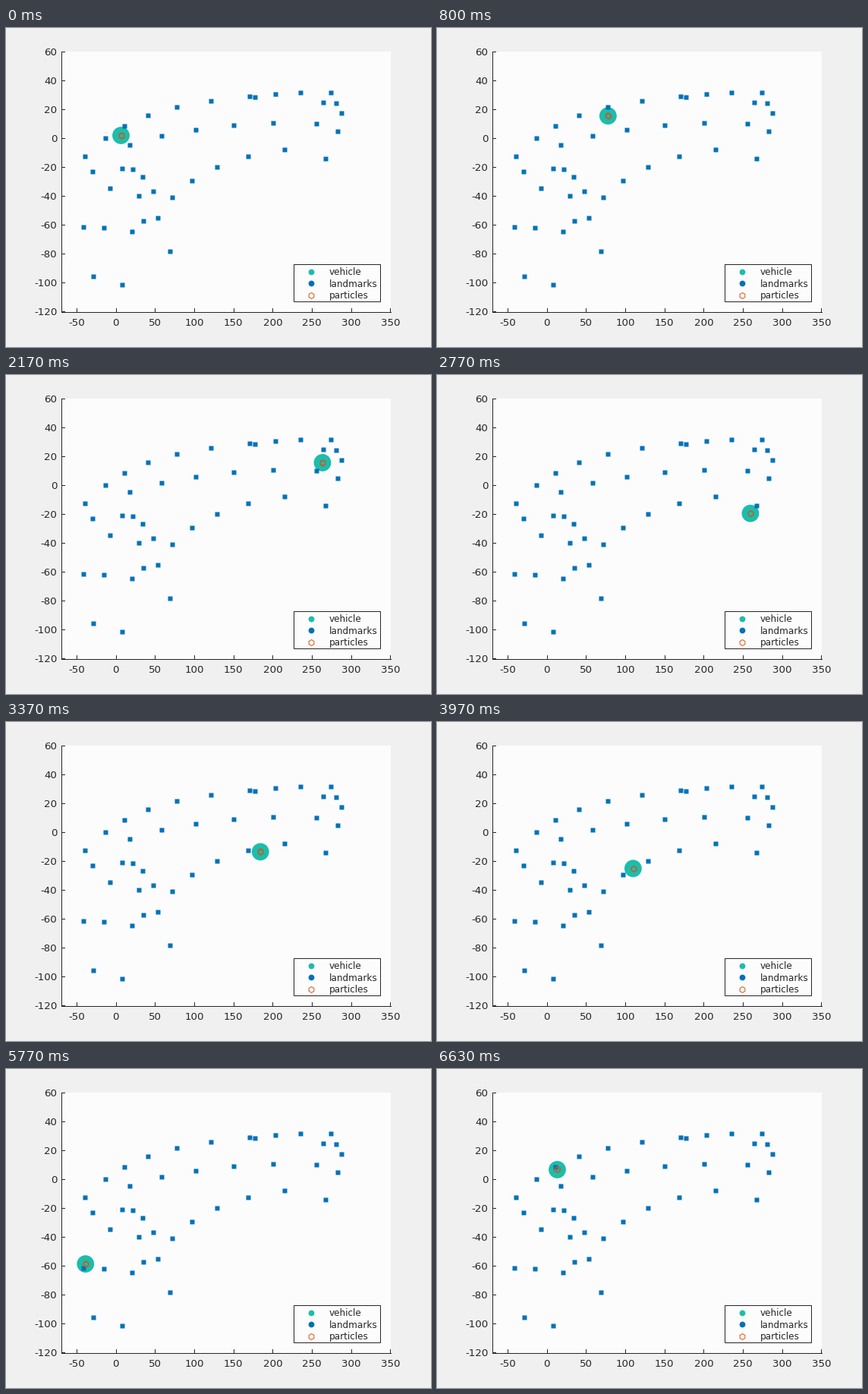
A matplotlib script that plays this animation: 560x420 px, repeating every 6.66 s.

```python
import numpy as np
import matplotlib.pyplot as plt
from matplotlib.animation import FuncAnimation
from matplotlib.patches import Circle, Rectangle

W, H, DPI = 560, 420, 100
LOOP, INTERVAL, STEPS = 6660, 30, 200
PT = 72 / DPI  # points per pixel

BACK, PANEL, INK = "#f0f0f0", "#fcfcfc", "#262626"
TEAL, BLUE, ORANGE = "#1cbdac", "#0072b8", "#d95319"

# Way points of the drive, evenly spaced in time
ROUTE = np.array([
    (151.5, 141.5), (189, 126), (251, 110), (325, 100), (395, 98),
    (424, 134), (407, 187), (342, 171), (279, 182), (227, 222),
    (186, 305), (137, 326), (106, 271), (115, 177), (158.5, 132.5),
])

# Landmarks stand in bent rows along the road: count, start, middle, end
ROWS = [
    (6, (131, 145), (206, 110), (321, 90)),
    (4, (328, 91), (371, 86), (428, 85)),
    (6, (163, 154), (275, 131), (409, 126)),
    (5, (418, 98), (442, 112), (421, 172)),
    (6, (367, 160), (261, 192), (200, 250)),
    (4, (153, 185), (174, 190), (194, 215)),
    (3, (104, 169), (114, 189), (137, 211)),
    (4, (102, 262), (131, 340), (216, 294)),
    (4, (129, 263), (177, 264), (175, 221)),
]


def follow(p, n):
    """Smooth curve through the points p, sampled n times."""
    m = np.gradient(p, axis=0)
    s = np.linspace(0, len(p) - 1, n)
    i = np.minimum(s.astype(int), len(p) - 2)
    u = (s - i)[:, None]
    v = 1 - u
    return (v * v * (1 + 2 * u) * p[i] + u * v * v * m[i]
            + u * u * (3 - 2 * u) * p[i + 1] - u * u * v * m[i + 1])


def row(n, start, middle, end):
    """n points on the parabola through three points."""
    u = np.linspace(0, 1, n)
    weights = [(1 - u) * (1 - 2 * u), 4 * u * (1 - u), u * (2 * u - 1)]
    return np.transpose(weights) @ np.array([start, middle, end])


path = follow(ROUTE, STEPS)
landmarks = np.vstack([row(*r) for r in ROWS]) - 0.4
jitter = np.random.default_rng(4).uniform(-0.5, 0.5, (STEPS, 2, 2))

fig = plt.figure(figsize=(W / DPI, H / DPI), dpi=DPI, facecolor=BACK)
ax = fig.add_axes([0, 0, 1, 1])
ax.set(xlim=(0, W), ylim=(H, 0))
ax.axis("off")


def line(xs, ys):
    ax.plot(xs, ys, color=INK, lw=PT, zorder=2)


def label(x, y, text, px, ha):
    ax.text(x, y, text, size=px * PT, color=INK, ha=ha, va="baseline",
            family="DejaVu Sans", zorder=7)


def dots(xs, ys, marker, px, face, edge="none", z=4):
    return ax.plot(xs, ys, marker, ms=px * PT, mfc=face, mec=edge,
                   mew=PT, zorder=z)[0]


# Axes
ax.add_patch(Rectangle((73, 31), 434, 343, fc=PANEL, ec="none", zorder=1))
line([72.5, 72.5], [31, 374])
line([72.5, 507], [373.5, 373.5])
for v in range(-50, 351, 50):
    x = 144.8 + 1.033 * v
    line([x, x], [373.5, 369])
    label(x, 391.6, str(v), 13.33, "center")
for v in range(-120, 61, 20):
    y = 145 - 1.904 * v
    line([72.5, 77], [y, y])
    label(67.3, y + 5, str(v), 13.33, "right")

# Legend
ax.add_patch(Rectangle((378.5, 310.5), 114, 49, fc=PANEL, ec=INK,
                       lw=PT, zorder=2))
entries = [("vehicle", "o", TEAL, "none"), ("landmarks", "o", BLUE, "none"),
           ("particles", "h", "none", ORANGE)]
for i, (name, marker, face, edge) in enumerate(entries):
    y = 320.6 + 15.7 * i
    dots([402], [y], marker, 7.8, face, edge)
    label(425.7, y + 4.4, name, 12, "left")

# Map and vehicle
vehicle = ax.add_patch(Circle(path[0], 11.4, fc=TEAL, ec="none", zorder=3))
dots(*landmarks.T, "s", 5.2, BLUE)
particles = dots([], [], "h", 7.6, "none", ORANGE, 5)


def draw(k):
    step = min(round(k * INTERVAL * STEPS / LOOP), STEPS - 1)
    vehicle.center = path[step]
    particles.set_data(*(path[step] + jitter[step]).T)
    return vehicle, particles


anim = FuncAnimation(fig, draw, frames=LOOP // INTERVAL, interval=INTERVAL,
                     repeat=True, repeat_delay=0, blit=False)
plt.show()
```
